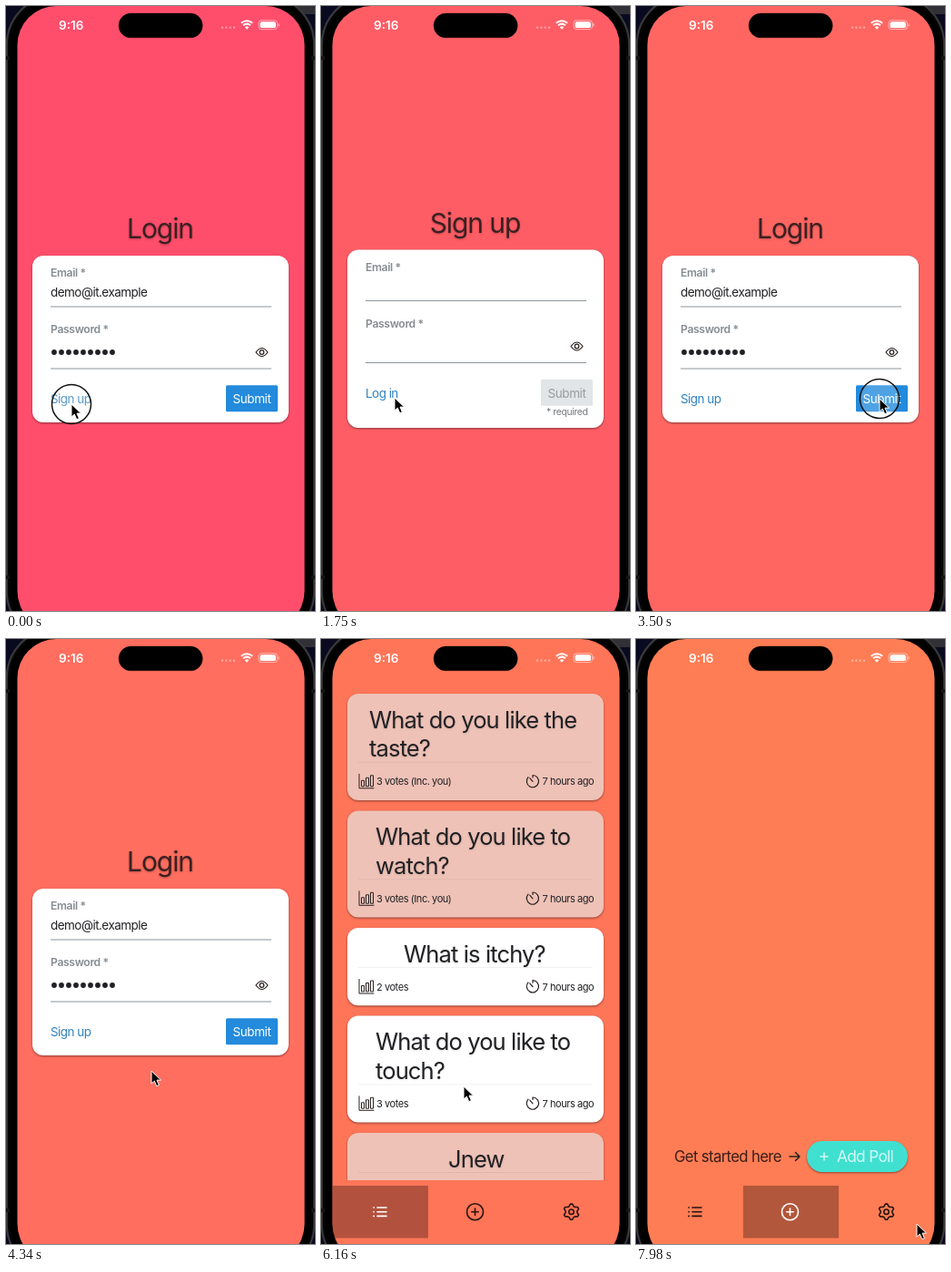
Recreate the animation shown at these times as an HTML page. Size 340 by 664 pixels, loop 8000 ms.

```html
<!DOCTYPE html>
<html lang="en">
<head>
<meta charset="utf-8">
<title>Poll app</title>
<style>
  html, body { margin: 0; width: 100%; height: 100%; overflow: hidden; background: #090920; }
  svg { display: block; width: 340px; height: 664px; }
  text { font-family: Inter, sans-serif; letter-spacing: -.04em; fill: #202124; white-space: pre; }
  .title { font-size: 30px; letter-spacing: -.036em; text-anchor: middle; fill: #3a2122; filter: drop-shadow(0 1px 1px rgba(45, 20, 20, .3)); }
  .card { filter: drop-shadow(.6px 1.6px 1.2px rgba(45, 20, 20, .55)); }
  .label { font-size: 12.2px; font-weight: 600; letter-spacing: -.03em; fill: #858b91; }
  .value, .link, .submit { font-size: 13.5px; }
  .link { fill: #3182bd; }
  .submit { text-anchor: middle; letter-spacing: -.03em; }
  .question { font-size: 25.5px; letter-spacing: -.034em; filter: drop-shadow(0 1px 1px rgba(0, 0, 0, .12)); }
  .meta { font-size: 11px; }
  .icon { fill: none; stroke: #29201f; stroke-width: 1.2; stroke-linecap: round; stroke-linejoin: round; }
  .tab { fill: none; stroke: #29130e; stroke-width: 1.6; stroke-linecap: round; stroke-linejoin: round; }
  .tab.active { stroke: #fff; }
</style>
</head>
<body>
<svg viewBox="0 0 340 664">
  <defs>
    <clipPath id="screenClip"><rect x="12.5" width="316" height="685" rx="43"/></clipPath>
    <clipPath id="listClip"><rect x="13" y="40" width="316" height="554"/></clipPath>
  </defs>

  <rect width="340" height="664" fill="#090920"/>
  <rect x="300" width="40" height="9" fill="#303036"/>
  <rect x=".8" y="-12" width="338.4" height="709" rx="55" fill="#050505" stroke="#39393b" stroke-width="2.2"/>
  <path d="M0 57h4M0 627h4M336 57h4M336 627h4" stroke="#151516" stroke-width="4"/>
  <rect x="4.5" y="-8" width="331" height="701" rx="51" fill="#000"/>

  <g clip-path="url(#screenClip)">
    <rect id="background" x="12" width="317" height="685"/>
    <g id="forms"><g id="login"></g><g id="signup"></g></g>
    <g id="list" clip-path="url(#listClip)"></g>
    <g id="add">
      <text x="42" y="574" font-size="16.8" style="fill:#3c1e17">Get started here</text>
      <path class="icon" d="M169 568h11m-4.5-4.5 4.5 4.5-4.5 4.5" style="stroke-width:1.5"/>
      <rect class="card" x="188" y="551" width="111" height="34" rx="17" fill="#40e0d0"/>
      <path d="M202.5 568h9m-4.5-4.5v9" stroke="#d5faf6" stroke-width="1.5"/>
      <text x="221" y="574" font-size="17.3" style="fill:#d5faf6">Add Poll</text>
    </g>
    <g id="tabs">
      <rect id="highlight" y="600" width="105.2" height="57.5" fill="#000" opacity=".3"/>
      <path id="topLine" d="M13 600.5h105" stroke="#c9284f"/>
      <path class="tab" d="M62 624h10m-10 4.7h10m-10 4.7h10M57.9 624h.4m-.4 4.7h.4m-.4 4.7h.4"/>
      <g class="tab"><circle cx="169.5" cy="628.7" r="9"/><path d="M165.8 628.7h7.4m-3.7-3.7v7.4"/></g>
      <g class="tab"><path id="gear"/><circle cx="275.5" cy="628.7" r="2.7"/></g>
    </g>
  </g>

  <rect x="124" y="8" width="92.3" height="26.8" rx="13.4" fill="#000" stroke="#000" stroke-opacity=".3"/>
  <text x="58" y="25.5" font-size="13.5" font-weight="600" style="fill:#fff;letter-spacing:0">9:16</text>
  <path d="M238 23.7h.1m4.2 0h.1m4.2 0h.1m4.2 0h.1" stroke="#fff" stroke-opacity=".45" stroke-width="2.3" stroke-linecap="round"/>
  <path d="M258.8 18.8q6.2-5.2 12.4 0M261 21.3q4-3.4 8 0" fill="none" stroke="#fff" stroke-width="2"/>
  <path d="M262.8 23.2q2.2-1.8 4.4 0l-2.2 2.5z" fill="#fff"/>
  <rect x="278" y="15.8" width="20.5" height="9.8" rx="3" fill="none" stroke="#fff" stroke-opacity=".5"/>
  <rect x="279.6" y="17.3" width="17.3" height="6.8" rx="1.9" fill="#fff"/>
  <path d="M300 19.2v3" stroke="#fff" stroke-opacity=".55" stroke-width="1.3"/>

  <circle id="ring" r="21.5" fill="#fff" fill-opacity=".2" stroke="#111" stroke-width="1.5"/>
  <path id="cursor" d="M0 0v14.2l3.3-3.1 2.4 5.6 2.7-1.1-2.4-5.5h4.6z" stroke="#fff" stroke-width="1" stroke-linejoin="round"/>
</svg>

<script>
const LOOP = 8000;
const $ = id => document.getElementById(id);
const text = (cls, x, y, value) => `<text class="${cls}" x="${x}" y="${y}">${value}</text>`;
const card = (y, height, fill = '#fff') =>
  `<rect class="card" x="29" y="${y}" width="282" height="${height}" rx="12" fill="${fill}"/>`;

function form({ title, top, height, link, email = '', dots = 0, enabled }) {
  const y = offset => top + offset;
  const rule = offset => `<path d="M49 ${y(offset)}h243" stroke="#8c969b"/>`;
  const bullets = Array.from({ length: dots }, (_, i) =>
    `<circle cx="${53 + i * 8}" cy="${y(106)}" r="2.9" fill="#202124"/>`).join('');
  return card(top, height)
    + text('title', 169.5, y(-19), title)
    + text('label', 49, y(23), 'Email *') + text('value', 49, y(45.3), email) + rule(56)
    + text('label', 49, y(85.3), 'Password *') + bullets + rule(124)
    + `<path class="icon" d="M275 ${y(106)}q6.5-9 13 0q-6.5 9-13 0z"/>`
    + `<circle class="icon" cx="281.5" cy="${y(106)}" r="2.3"/>`
    + text('link', 49, y(162), link)
    + `<rect x="242" y="${y(142.3)}" width="57" height="29" rx="1.5" fill="${enabled ? '#238adc' : '#e2e5e7'}"/>`
    + `<text class="submit" x="270.5" y="${y(162)}" style="fill:${enabled ? '#fff' : '#979ca0'}">Submit</text>`
    + (enabled ? '' : `<text x="248" y="${y(181.5)}" font-size="10.5" style="fill:#777c80">* required</text>`);
}

function poll({ y, x, lines, votes, voted }) {
  const extra = (lines.length - 1) * 31.8;
  const row = y + 68.5 + extra;
  return card(y, 85.3 + extra, voted ? '#efc2b7' : '#fff')
    + lines.map((line, i) => text('question', x, y + 37.5 + i * 31.8, line)).join('')
    + `<path d="M41 ${y + 43.5 + extra}h258" stroke="#000" stroke-opacity=".06"/>`
    + `<path class="icon" style="stroke-width:1" d="M42 ${row - 12}v15.5h16M44.5 ${row + 1}v-6h3v6zm5 0v-9h3v9zm5 0v-11.5h3v11.5z"/>`
    + text('meta', 61, row, votes + (voted ? ' (Inc. you)' : ''))
    + `<path class="icon" d="M233 ${row - 10.8}a6.6 6.6 0 1 1-5 2.2M233 ${row - 10.8}v2.5M233 ${row - 4}l-3.3-3.7"/>`
    + text('meta', 243.5, row, '7 hours ago');
}

$('login').innerHTML = form({
  title: 'Login', top: 274, height: 183, link: 'Sign up', email: 'demo@it.example', dots: 9, enabled: true
});
$('signup').innerHTML = form({ title: 'Sign up', top: 267.5, height: 195.5, link: 'Log in' });
$('list').innerHTML = [
  { y: 60, x: 53, lines: ['What do you like the', 'taste?'], votes: '3 votes', voted: true },
  { y: 188.5, x: 60, lines: ['What do you like to', 'watch?'], votes: '3 votes', voted: true },
  { y: 317, x: 91, lines: ['What is itchy?'], votes: '2 votes' },
  { y: 413.5, x: 60, lines: ['What do you like to', 'touch?'], votes: '3 votes' },
  { y: 542, x: 140, lines: ['Jnew'], votes: '3 votes', voted: true }
].map(poll).join('');

// Six rounded teeth, four points each
$('gear').setAttribute('d', 'M' + Array.from({ length: 24 }, (_, i) => {
  const angle = (i - 1.5) * Math.PI / 12 - Math.PI / 2;
  const radius = i % 4 === 1 || i % 4 === 2 ? 8.6 : 6.5;
  return `${(275.5 + radius * Math.cos(angle)).toFixed(2)} ${(628.7 + radius * Math.sin(angle)).toFixed(2)}`;
}).join('L') + 'z');

const tabIcons = [...document.querySelectorAll('.tab')];
const shades = [[78, 108], [86, 105], [93, 101], [102, 98], [110, 95], [117, 88], [125, 85]];
const clicks = [[0, 70], [1890, 2030], [3430, 3570], [6440, 6510]];
const cursorPath = [
  [0, 72, 437], [350, 72, 437], [900, 81, 430], [2030, 81, 430], [2660, 212, 436], [3150, 268, 431],
  [3640, 268, 431], [4340, 160, 474], [5700, 160, 474], [6160, 157, 491], [6430, 169, 630],
  [7560, 169, 630], [7980, 309, 642]
];

const ramp = (t, from, to) => {
  const p = Math.min(1, Math.max(0, (t - from) / (to - from)));
  return p * p * (3 - 2 * p);
};

function cursorAt(t) {
  const next = cursorPath.findIndex(key => key[0] > t);
  if (next < 0) return cursorPath.at(-1).slice(1);
  const [t0, x0, y0] = cursorPath[next - 1], [t1, x1, y1] = cursorPath[next];
  const p = ramp(t, t0, t1);
  return [x0 + (x1 - x0) * p, y0 + (y1 - y0) * p];
}

function show(id, opacity) {
  $(id).style.opacity = opacity;
  $(id).style.display = opacity > 0 ? '' : 'none';
}

function render(t) {
  const returning = t >= 1500;
  const [green, blue] = shades[Math.min(6, Math.floor((t + 1010) / 1330))];
  $('background').setAttribute('fill', `rgb(255 ${green} ${blue})`);

  const front = $(returning ? 'login' : 'signup');
  if ($('forms').lastElementChild !== front) $('forms').append(front);
  show('login', returning ? ramp(t, 2030, 2450) * (1 - ramp(t, 4690, 5040)) : 1 - ramp(t, 910, 1050));
  show('signup', returning ? 1 - ramp(t, 2660, 2800) : ramp(t, 280, 700));
  show('list', ramp(t, 5560, 5950) * (1 - ramp(t, 7210, 7490)));
  show('add', ramp(t, 6650, 7100));

  const active = t < 6600 ? 0 : 1;
  show('tabs', t >= 5530 ? 1 : 0);
  $('tabs').setAttribute('transform', `translate(0 ${25 * (1 - ramp(t, 5530, 5740))})`);
  $('highlight').setAttribute('x', 12.7 + active * 105.2);
  $('highlight').style.opacity = .3;
  show('topLine', t < 5600 ? 1 : 0);
  tabIcons.forEach((icon, i) => icon.classList.toggle('active', i === active));

  const position = `translate(${cursorAt(t)})`;
  $('cursor').setAttribute('transform', position);
  $('ring').setAttribute('transform', position);
  show('cursor', t < 5040 || t >= 5740 ? 1 : 0);
  show('ring', clicks.some(([from, to]) => t >= from && t < to) ? 1 : 0);
}

const start = performance.now();
function frame() {
  render((performance.now() - start) % LOOP);
  requestAnimationFrame(frame);
}
frame();
</script>
</body>
</html>
```
